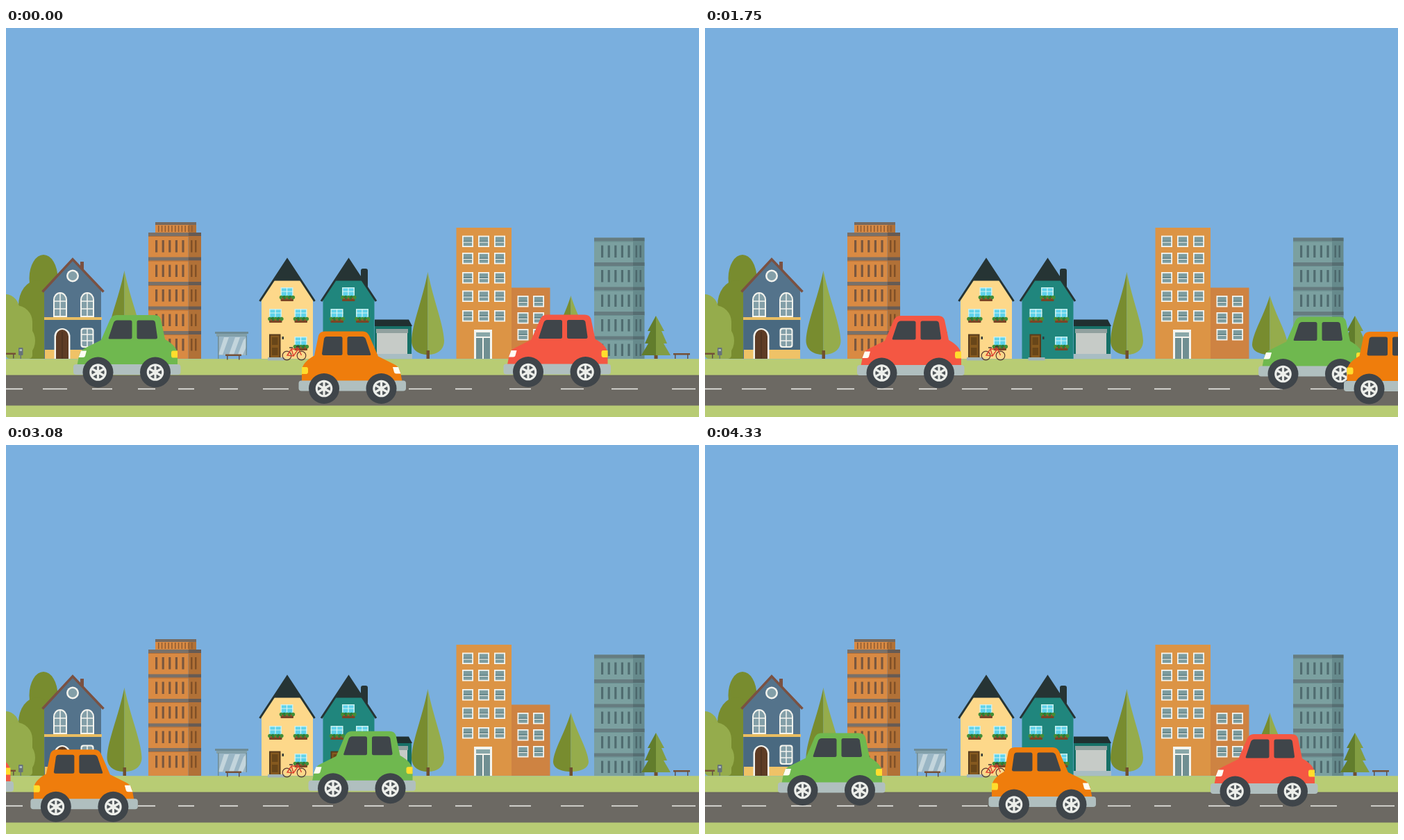
Animation, 998 px wide and 561 px high, one loop 4370 ms. Source, as an HTML page with a canvas:

```html
<!DOCTYPE html>
<html lang="en">
<head>
<meta charset="utf-8">
<title>Town street</title>
<style>
  html, body { margin: 0; height: 100%; overflow: hidden; background: #7aafde; }
  canvas { display: block; }
</style>
</head>
<body>
<canvas id="stage" width="998" height="561"></canvas>
<script>
const stage = document.getElementById('stage');
let g = stage.getContext('2d');

const rect = (color, x, y, w, h, r = 0) => {
  g.fillStyle = color;
  g.beginPath();
  g.roundRect(x, y, w, h, r);
  g.fill();
};
const shape = (color, d) => { g.fillStyle = color; g.fill(new Path2D(d)); };
const line = (color, width, d) => {
  g.strokeStyle = color;
  g.lineWidth = width;
  g.stroke(new Path2D(d));
};
const oval = (color, x, y, rx, ry = rx) => {
  g.fillStyle = color;
  g.beginPath();
  g.ellipse(x, y, rx, ry, 0, 0, 7);
  g.fill();
};

const OLIVE = '#788c2f', LEAF = '#95ac4c', BROWN = '#765036', GLASS = '#7d9c9f', WHITE = '#f4f4ee';

function bench(x, y, w) {
  rect(BROWN, x, y, w, 2.5);
  rect('#5f5148', x + 2, y + 2, 1.5, 6);
  rect('#5f5148', x + w - 4, y + 2, 1.5, 6);
}

function bushes() {
  oval(OLIVE, 54, 361, 20.5, 34);
  oval(OLIVE, 45, 400, 27, 36);
  rect(OLIVE, 28, 400, 32, 77);
  oval(LEAF, 0, 409, 20, 25);
  oval(LEAF, 14, 424, 24, 24);
  oval(LEAF, 18, 451, 24, 26);
  rect(LEAF, 0, 420, 38, 57, 5);
  bench(-8, 468.5, 22);
  rect('#66727a', 18, 461, 6.5, 11, 1);
  rect('#a9b9bd', 19.5, 463, 3.5, 3);
  rect('#66727a', 20.5, 471, 1.5, 6);
}

function coneTree(x, top, half) {
  const bottom = 471, span = bottom - top;
  const at = (dx, dy) => `${x + dx * half} ${top + dy * span}`;
  const side = s => `M${at(0, 0)}C${at(s * .35, .35)} ${at(s * .95, .62)} ${at(s, .83)}
    C${at(s, .94)} ${at(s * .6, 1)} ${at(0, 1)}Z`;
  shape(OLIVE, side(-1));
  shape(LEAF, side(1));
  rect('#70502f', x - 2, bottom - 6, 4.5, 12);
}

function firTree() {
  const side = s => `M936 415L${936 + s * 12} 437H${936 + s * 8}L${936 + s * 16} 455
    H${936 + s * 11}L${936 + s * 21} 472H936Z`;
  rect('#70502f', 933.5, 471, 5, 6);
  shape('#627d2c', side(-1));
  shape('#829d42', side(1));
}

function archWindow(x) {
  shape(WHITE, `M${x} 417V392a10 11 0 0 1 20 0V417Z`);
  shape('#839fa8', `M${x + 2} 415V392a8 9 0 0 1 16 0V415Z`);
  line(WHITE, 1.5, `M${x + 10} 382V416M${x + 2} 394H${x + 18}M${x + 2} 405H${x + 18}`);
}

function blueHouse() {
  rect('#7a5142', 107, 337, 5, 18);
  shape('#54738b', 'M96 334L137 378V477H55V378Z');
  rect('#496980', 56, 421, 81, 44);
  rect('#e9bd62', 55, 417, 83, 4);
  rect('#efc267', 56, 464, 81, 13);
  line('#7a5142', 3.5, 'M52.5 380.5L96 333.5L140.5 380.5');
  oval(WHITE, 96, 357.5, 9);
  oval('#839fa8', 96, 357.5, 6.5);
  archWindow(68);
  archWindow(107);
  shape(WHITE, 'M69.5 477V445a11.5 12 0 0 1 23 0V477Z');
  shape('#5e3c25', 'M72 477V445a9 10 0 0 1 18 0V477Z');
  rect('#432c1d', 80.5, 438, 1, 39);
  rect(WHITE, 107.5, 432.5, 19, 28.5, 4);
  rect('#839fa8', 109.5, 434.5, 15, 24.5, 3);
  line(WHITE, 1.5, 'M117 434V460M109 442H125M109 451H125');
}

function tower(x, top, front, side, c) {
  rect(c.front, x, top, front, 477 - top);
  rect(c.side, x + front, top, side, 477 - top);
  for (let i = 0; i < 5; i++) {
    const y = top + i * 35.5;
    rect(c.band, x, y, front, 5);
    rect(c.shade, x + front, y, side, 5);
    rect(c.dim, x, y + 5, front + side, 1);
    for (let k = 0; k < 5; k++) rect(c.pane, x + 10 + k * 9.6, y + 11, 3.2, 17.5);
    rect(c.dark, x + front + 3.5, y + 11, 2.5, 17.5);
    rect(c.dark, x + front + 9.5, y + 11, 2.5, 17.5);
  }
}

function busStop() {
  rect('#9ab6c5', 306, 444, 41, 28);
  shape('#c3d5dc', 'M314 446H321L312 471H306ZM330 446H337L328 471H321ZM342 450L346 446V460L341 471H334Z');
  rect('#6d8b96', 301, 438, 48, 3);
  rect('#82a0aa', 303, 441, 44, 4);
  rect('#6d8b96', 305, 444, 1.5, 33);
  rect('#6d8b96', 345.5, 444, 1.5, 28);
  bench(316, 470.5, 23);
}

function flowerWindow(x, y) {
  rect('#c9efee', x, y, 18, 15);
  rect('#5fd3eb', x + 1.5, y + 1.5, 15, 12);
  line('#d8f4f2', 1.2, `M${x + 9} ${y}V${y + 14}M${x} ${y + 6}H${x + 18}`);
  rect('#7b4526', x, y + 15, 18.5, 5, 1);
  for (let i = 0; i < 5; i++) oval(i % 2 ? '#2c7a35' : '#438e37', x + 1 + i * 4.2, y + 14.5, 2.8);
  for (let i = 0; i < 3; i++) oval('#bd3e31', x + 3 + i * 6, y + 16, 1.1);
}

function gableHouse(x, wall) {
  g.save();
  g.translate(x, 0);
  shape(wall, 'M-37 477V391L0 335L37 391V477Z');
  shape('#263434', 'M0 333L-21 364.5H21Z');
  line('#263434', 3, 'M-39.5 394L0 334L39.5 394');
  flowerWindow(-9.5, 374);
  flowerWindow(-26, 405);
  flowerWindow(10.5, 405);
  flowerWindow(10.5, 445);
  rect('#573b1c', -26, 441.5, 16.5, 34);
  rect('#85591f', -24, 443.5, 12.5, 32);
  rect('#684619', -22, 446, 8.5, 11);
  rect('#684619', -22, 461, 8.5, 11);
  rect('#333b39', -7.5, 445, 2.5, 4);
  rect('#a1b4b8', -28, 475, 24, 4.5);
  g.restore();
}

function bike() {
  for (const x of [404.5, 425.5]) {
    g.beginPath();
    g.arc(x, 472.5, 6.3, 0, 7);
    g.strokeStyle = '#5a3a32';
    g.lineWidth = 1.2;
    g.stroke();
  }
  line('#d9402f', 1.4, 'M405 472L411 463H421L414 473ZM411 463L414 473M425.5 472L420 460');
  line('#403432', 1.3, 'M408 461H413M418 459.5H423');
}

function garage() {
  rect('#177067', 531, 428, 53, 43);
  shape('#203030', 'M531 420.5H580L585 430H531Z');
  rect('#91a19f', 533, 434, 46, 6);
  rect('#c6cbc7', 534, 440, 44, 30);
  rect('#a8bdc3', 531, 470, 54, 7);
}

function sashWindow(x, y) {
  rect(WHITE, x, y, 16, 16.5);
  rect(GLASS, x + 1.8, y + 1.8, 12.4, 12.9);
  rect('#5c7d80', x + 1.8, y + 7.5, 12.4, 1.5);
  rect(WHITE, x + 1.8, y + 9, 12.4, 1);
}

function apartments() {
  rect('#dc9445', 648.5, 288, 79.5, 189);
  rect('#ce8342', 728, 374.5, 55.5, 102.5);
  for (const y of [299.5, 324, 352, 378.5, 407])
    for (const x of [657, 680, 703]) sashWindow(x, y);
  for (const y of [386, 410, 434])
    for (const x of [736.5, 759]) sashWindow(x, y);
  rect(WHITE, 674, 435, 26, 42);
  rect('#89a7a8', 677, 439, 20, 6);
  rect('#708f92', 677, 447, 9, 30);
  rect('#708f92', 688, 447, 9, 30);
}

function scenery() {
  rect('#7aafde', 0, 0, 998, 561);
  rect('#b8cc74', 0, 477.3, 998, 84);
  bushes();
  blueHouse();
  coneTree(170.5, 350, 25);
  rect('#d98a43', 215, 280, 48, 16);
  rect('#b17137', 263, 280, 11, 16);
  rect('#75695f', 215, 280, 59, 4);
  for (let i = 0; i < 11; i++) rect('#8d5b33', 219 + i * 4.8, 285, 1.5, 9);
  tower(205, 295, 57.5, 18.5, {
    front: '#d98a43', side: '#b17137', band: '#79716a', shade: '#665b54',
    dim: '#b46f37', pane: '#79573f', dark: '#805027'
  });
  busStop();
  rect('#263434', 511, 347, 10, 28, 3);
  gableHouse(405, '#fdd88a');
  gableHouse(493.5, '#20867d');
  bike();
  garage();
  coneTree(607.5, 352, 23.5);
  apartments();
  coneTree(813.5, 386, 25.5);
  tower(847, 302.5, 56, 16.5, {
    front: '#7ba0a0', side: '#668a8c', band: '#667c80', shade: '#566e72',
    dim: '#698e90', pane: '#506c70', dark: '#4c686c'
  });
  firTree();
  bench(961, 469, 24);
  rect('#6c6963', 0, 500.7, 998, 43.8);
  rect('#65625d', 0, 500.7, 998, 1.2);
  const dashes = [[0, 24], [53, 88], [124, 153], [190, 215], [248, 271], [308, 334], [370, 407], [441, 471],
    [516, 544], [580, 613], [647, 671], [725, 756], [799, 832], [872, 910], [959, 993]];
  for (const [a, b] of dashes) rect('#efefeb', a, 519.7, b - a, 1.6);
}

function wheel(x, y) {
  oval('#3f454a', x, y, 22);
  oval('#eceeea', x, y, 12.3);
  oval('#50565a', x, y, 9.2);
  for (let i = 0; i < 6; i++) {
    const a = i * Math.PI / 3 + Math.PI / 6;
    line('#eceeea', 3.2, `M${x} ${y}L${x + 10 * Math.cos(a)} ${y + 10 * Math.sin(a)}`);
  }
  oval('#eceeea', x, y, 3.8);
}

function car(color, x, y, flip) {
  g.save();
  g.translate(flip ? x + 154.5 : x, y);
  if (flip) g.scale(-1, 1);
  shape(color, `M5.5 72L8 59Q10 50 18 47L40 36L53 6Q56 0 62 0H117Q124 0 126 6L132 35
    Q150 45 150 57V72Z`);
  shape('#3f454a', 'M52 34.5Q50 34.5 51 32L58 11Q59.5 7.5 63 7.5H82Q84.5 7.5 84.5 10V32Q84.5 34.5 82 34.5Z');
  shape('#3f454a', 'M94 7.5H114Q117.5 7.5 118 11L121 32Q121 34.5 118.5 34.5H94Q91.5 34.5 91.5 32V10Q91.5 7.5 94 7.5Z');
  shape('#fffdf3', 'M11 51.5H19L17 59Q16.5 61 14 61H7.5Z');
  shape('#ffdd2d', 'M143 51.5H150V61.5H143Q141 61 141 58.5V54Q141 51.5 143 51.5Z');
  rect('#b0bfbf', 0, 71, 154.5, 15, 4);
  wheel(35.5, 82.5);
  wheel(118, 82.5);
  g.restore();
}

// Each key: step, left edge, roof height. Neighbouring steps far apart mean a jump across the stage.
const greenPath = [[0, 97, 414], [15, -83, 415.5], [27, -149, 408.5], [28, 998, 416], [42, 797, 416.5],
  [62, 564, 413], [86, 307, 412.5], [92, 242, 412], [104, 105, 415.5], [105, 97, 414]];
const redPath = [[0, 716.5, 413.5], [15, 534, 415.5], [27, 407.5, 416], [42, 219, 415], [52, 105, 414.5],
  [62, -6, 413.5], [75, -155, 414], [76, 1027, 415], [86, 917, 416], [104, 728, 417], [105, 716.5, 413.5]];
const orangePath = [[0, 421.5, 437.5], [15, 618, 435.5], [27, 753.5, 437.5], [42, 920, 438], [49, 1000, 438],
  [50, -160, 440], [60, -160, 440], [62, -131.5, 440], [78, 91, 439], [86, 186, 437], [95, 298, 438.5],
  [104, 408.5, 436], [105, 421.5, 437.5]];

function along(path, step) {
  const i = path.findIndex(key => key[0] > step);
  const [n0, x0, y0] = path[i - 1], [n1, x1, y1] = path[i];
  const k = (step - n0) / (n1 - n0);
  return [x0 + (x1 - x0) * k, y0 + (y1 - y0) * k];
}

const LOOP = 4370;
const screen = g;
const backdrop = document.createElement('canvas');
backdrop.width = 998;
backdrop.height = 561;
g = backdrop.getContext('2d');
scenery();
g = screen;

function draw() {
  // 24 steps a second, rounded to hundredths of a second
  const step = Math.min(104, Math.floor((performance.now() % LOOP + 4.9) * .024));
  g.drawImage(backdrop, 0, 0);
  car('#6fb84f', ...along(greenPath, step));
  car('#f45743', ...along(redPath, step));
  car('#ef7d0c', ...along(orangePath, step), true);
  requestAnimationFrame(draw);
}
draw();
</script>
</body>
</html>
```
